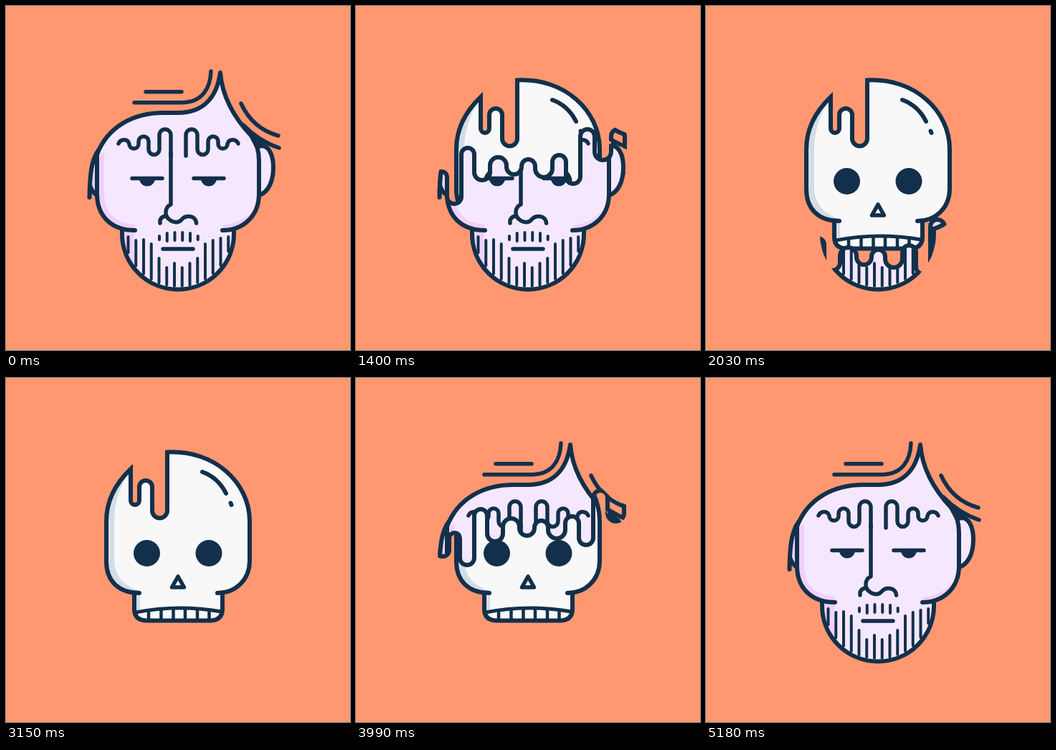
These frames come from a looping animation (480x480 px, 5.25 s). An HTML page:

```html
<!DOCTYPE html>
<html lang="en">
<head>
<meta charset="utf-8">
<title>Melting face</title>
<style>
  html, body { margin: 0; height: 100%; overflow: hidden; background: #ff9871; }
  svg { display: block; width: 100%; height: 100%; }
  .ink { fill: none; stroke: #12304b; stroke-width: 6; stroke-linecap: round; stroke-linejoin: round; }
  .solid { fill: #12304b; }
  .skin { fill: #f5e7fd; }
  .blush { fill: #f0d0fb; }
  .bone { fill: #f8f8f9; }
  .shade { fill: #d4dde6; }
</style>
</head>
<body>
<svg viewBox="0 0 480 480">
  <defs>
    <clipPath id="above"><path class="edge" data-close="-2000"/></clipPath>
    <clipPath id="below"><path class="edge" data-close="2000"/></clipPath>

    <path id="cranium" d="M186 300C157 300 140 283 140 256V200C140 172 153 147 174 127V171a6 6 0 0 0 12 0V152a9 9 0 0 1 18 0V185a10.500 10.500 0 0 0 21 0V103.500C291 100 340 146 340 200V255C340 282 320 300 295 300"/>
    <path id="head" d="M180 313C148 313 127 294 127 262V207C142 168 178 149 220 149H240C275 149 294 128 299 93C302 130 322 160 343 182Q353 196 353 215V262C353 294 330 313 302 313"/>
    <path id="jaw" d="M162 313V318A78 77.500 0 0 0 318 318V313"/>
    <path id="rightEar" d="M353 196C366 191 373 208 373 225C373 245 366 259 354 264"/>
    <path id="leftEar" d="M129 201C119 215 117 235 116.500 267L117 250Q120 260 127 264"/>
    <path id="wrinkle" d="M251 209V180a8 8 0 0 1 16 0V200a7.500 7.500 0 0 0 15 0V189a7 7 0 0 1 14 0V192.500a6.500 6.500 0 0 0 13 0C311 185 321 185 324 192"/>

    <!-- Where the dripping outline may be seen -->
    <mask id="faceArea" maskUnits="userSpaceOnUse" x="0" y="0" width="480" height="480">
      <g fill="#fff" stroke="#fff" stroke-width="6" stroke-linejoin="round">
        <use href="#head"/><use href="#jaw"/><use href="#leftEar"/><use href="#rightEar"/>
        <path d="M179 135L195 120H245L286 91L299 93V150H220ZM328 136Q345 170 380 181V198Q352 188 330 166Z"/>
      </g>
      <path id="strands" fill="#fff" d="M150 105L143 122V165L128 178V197H150ZM162 115L174 129V173H162ZM311 105L317 111V165H310Z"/>
    </mask>
  </defs>

  <g id="skull">
    <path class="bone" d="M179 298V322Q179 338.500 197 338.500H284Q302 338.500 302 322V298Z"/>
    <path class="shade" d="M181 300H187V323H181Z"/>
    <path class="ink" d="M179 302V322Q179 338.500 197 338.500H284Q302 338.500 302 322V300"/>
    <path class="ink" style="stroke-width:5" d="M181 327Q240 315.500 300 326"/>
    <path class="ink" style="stroke-width:4.500" d="M199 324V337M216.500 323V337M233.500 322V337M250 322V337M267 323V337M283.500 324V337"/>
    <use href="#cranium" class="bone"/>
    <path class="shade" d="M186 300C157 300 140 283 140 256V200C140 176 150 155 168 137Q151 168 151 200V255Q152 286 186 297Z"/>
    <use href="#cranium" class="ink" style="stroke-linejoin:miter"/>
    <path class="ink" d="M274 131Q296 139 307 161M313.500 174.500l1 2.500"/>
    <circle class="solid" cx="196.500" cy="244.500" r="18.500"/>
    <circle class="solid" cx="283" cy="244.500" r="18.500"/>
    <path class="ink" style="stroke-width:5.500" d="M240 277L231.500 292H248.500Z"/>
  </g>

  <g id="face">
    <use href="#rightEar" class="skin"/><use href="#rightEar" class="ink"/>
    <use href="#leftEar" class="blush"/><use href="#leftEar" class="ink"/>
    <use href="#jaw" class="skin"/>
    <path class="blush" d="M164 314H180Q174 340 184 368Q164 345 164 314Z"/>
    <use href="#jaw" class="ink"/>
    <path id="beard" class="ink" style="stroke-width:4"/>
    <use href="#head" class="skin"/>
    <path class="blush" d="M127 207L137 205V262Q138 302 180 305V313C148 313 127 294 127 262ZM302 306Q332 303 350 280Q339 313 302 313Z"/>
    <use href="#head" class="ink"/>
    <path class="solid" d="M331 166Q352 187 368 193L352 194L354 210Z"/>
    <path class="ink" style="stroke-width:5.500" d="M179 134.700H245C274 134.700 285 115 286 91M195 119.700H245M328 136Q344 171 380 181M331 166Q352 188 381 198"/>
    <g class="ink" style="stroke-width:5.500">
      <use href="#wrinkle"/>
      <use href="#wrinkle" transform="translate(481) scale(-1 1)"/>
      <path d="M230 206V277C221 281 221 293 228 298C234 303 241 303 245 298C251 291 265 292 265.500 303M215 303C214 296 219 293 224 293"/>
      <path d="M176 240.500H218M262 240.500H304M219 339H261"/>
    </g>
    <path class="solid" d="M186 240.500H208A11 11 0 0 1 186 240.500ZM272 240.500H294A11 11 0 0 1 272 240.500Z"/>
  </g>

  <g mask="url(#faceArea)"><path class="ink edge"/></g>
</svg>

<script>
const LOOP = 5250, STEP = 70, SPEED = 0.2;
const $ = id => document.getElementById(id);

// Drip sides, and the alternating low and high points between them.
const sides = [94, 112, 127, 147, 165, 187, 210, 231, 250, 274, 293, 313, 333, 356, 375, 399];
const turns = [264, 231, 276, 198, 243, 211, 235, 214, 239, 208, 248, 172, 215, 172, 240];

const drip = `M${sides[0]} 200` + turns.map((y, i) => {
  const r = (sides[i + 1] - sides[i]) / 2, low = i % 2 === 0;
  const base = low ? y - r : y + r;
  return `V${base}A${r} ${r} 0 0 ${low ? 0 : 1} ${sides[i + 1]} ${base}`;
}).join("");

const edges = document.querySelectorAll(".edge");
edges.forEach(path => {
  const end = path.dataset.close;
  path.setAttribute("d", end ? `${drip}V${end}H${sides[0]}Z` : drip);
});

const beardTops = [322, 327, 326, 332, 352, 365, 359, 365, 359, 352, 332, 327, 324, 322];
const moustache = [[321, 326], [317, 328], [316, 327], [316, 327], [317, 328], [321, 326]];
$("beard").setAttribute("d",
  beardTops.map((top, i) => {
    const x = 170.5 + i * 10.75;
    return `M${x} ${top}V${316 + Math.sqrt(75 ** 2 - (x - 240) ** 2)}`;
  }).join("") +
  moustache.map(([top, bottom], i) => `M${214 + i * 10.75} ${top}V${bottom}`).join(""));

function render(now) {
  const t = Math.floor((now % LOOP) / STEP) * STEP;
  const growing = t >= 3430;
  const bare = t >= 2240 && !growing;
  const dx = growing ? 18 : 0;
  const dy = growing ? (t - 3990) * SPEED - 15 : bare ? 600 : (t - 1400) * SPEED;

  edges.forEach(path => path.setAttribute("transform", `translate(${dx} ${dy})`));
  $("face").setAttribute("clip-path", `url(#${growing ? "above" : "below"})`);
  $("skull").setAttribute("clip-path", `url(#${growing ? "below" : "above"})`);
  $("strands").style.display = t >= 630 && !growing ? "" : "none";
  requestAnimationFrame(render);
}
render(0);
</script>
</body>
</html>
```
